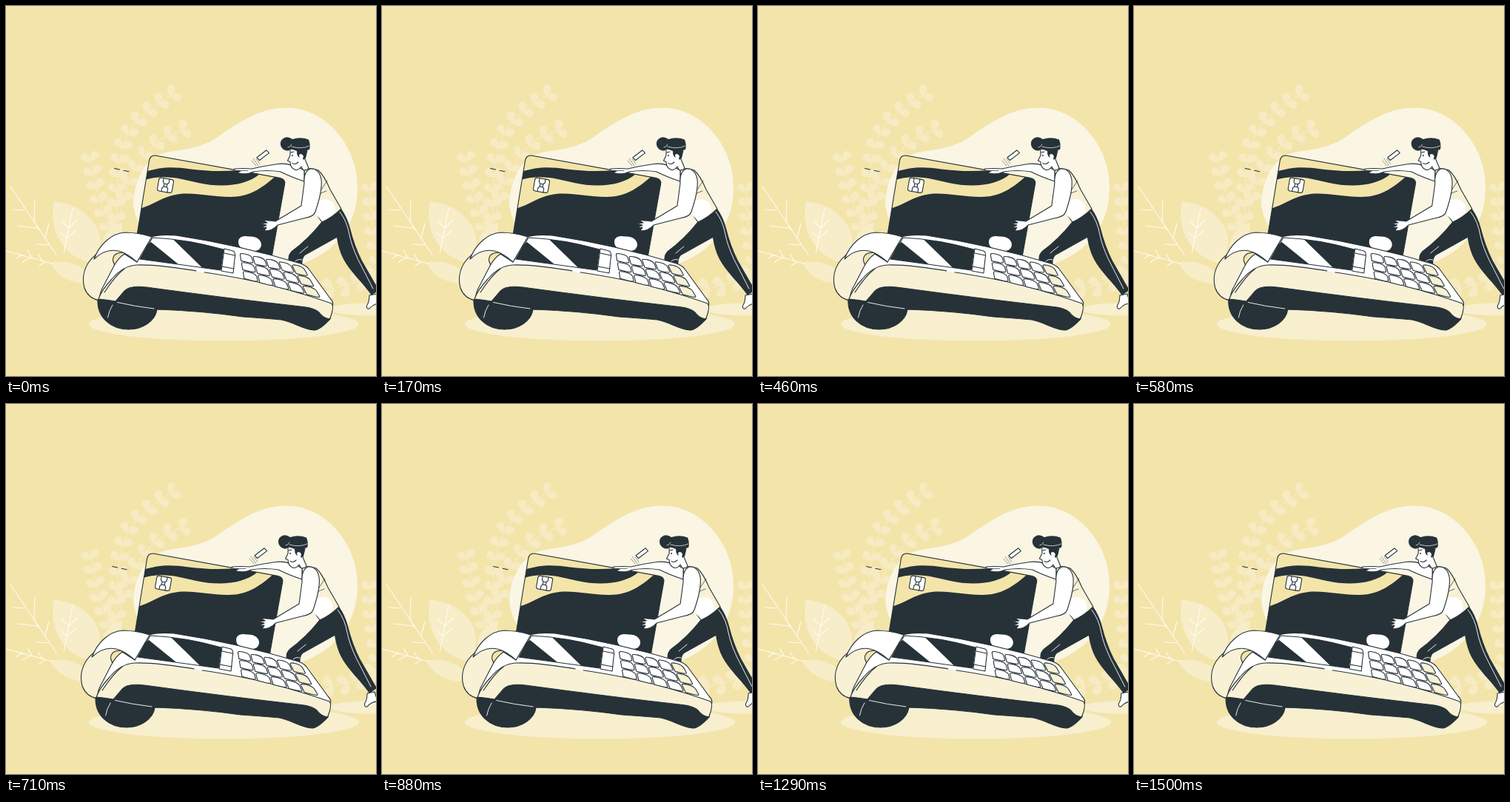
An HTML page for the animation above (1540 ms loop, 500x500 px).

```html
<!DOCTYPE html>
<html lang="en">
<head>
<meta charset="utf-8">
<title>Card payment</title>
<style>
html, body { margin: 0; width: 100%; height: 100%; overflow: hidden; background: #f3e4aa; }
svg { display: block; width: 100vw; height: 100vh; }
.ink { stroke: #263238; stroke-width: 1.1; stroke-linecap: round; stroke-linejoin: round; }
.line { fill: none; }
.white { fill: #fff; }
.cream { fill: #f9f1d5; }
.gold { fill: #f3e4aa; }
.dark { fill: #263238; }
.pale { fill: none; stroke: #fff; stroke-width: .9; stroke-linecap: round; }
.twig { fill: none; stroke: #fffcf0; stroke-width: 1.1; stroke-linecap: round; }
.fine { stroke-width: .7; }
</style>
</head>
<body>
<svg viewBox="0 0 500 500">
  <defs>
    <clipPath id="card"><path id="cardShape" d="M203 202.2 L370 232.4 Q378 234 376.600 241 L359 340 L177 310 L193.500 209 Q195 201 203 202.200Z"/></clipPath>
  </defs>

  <g id="sprigs" fill="#f6ebc2" stroke="#f6ebc2"></g>
  <g fill="#f7edc9">
    <path d="M64.500 264.500 C95 266 123 286 127 314 Q128 334 118 348 C82 341 57 311 64.500 264.500Z"/>
    <path d="M59.500 347 C80 342 107 348 120 374 C96 378 72 370 59.500 347Z"/>
    <path d="M156 292 C135 299 125 318 131 336 C148 332 159 315 156 292Z"/>
  </g>
  <g class="twig">
    <path d="M6 244 L68 336 M39 262 L38 290 L44 302 M10 275 L25 276 M16 297 L42 300 M58 294 L53 313 M40 322 L58 323"/>
    <path d="M0 331 L63 348 M13 342 L21 336 M22 346 L34 340 M29 330 L36 341 M44 336 L49 345 M45 351 L53 346"/>
    <path d="M90 273 L78 335 M75 291 L85 300 L96 289 M74 306 L82 314 L95 303"/>
  </g>
  <path fill="#faf6e3" d="M172 264 C174 236 187 205 216 198 C240 193 258 194 283 179 C315 157 342 138 378 137.500 C431 137 474 187 475 243 C476 302 438 337 395 350 L210 335 C188 312 172 287 172 264Z"/>
  <g fill="#f8efcf">
    <ellipse cx="294.500" cy="430" rx="182.500" ry="22.500"/>
    <ellipse cx="490" cy="410" rx="52" ry="8.500"/>
  </g>

  <g id="scene">
    <path class="ink line" d="M146.500 219.500 L153.500 221 M159 222.300 L166 223.700"/>

    <g clip-path="url(#card)">
      <path class="dark" d="M170 190 H390 V350 H170Z"/>
      <path class="gold" d="M188 195 H280 L312 222 C292 224 270 223 250 220.500 C226 217 211 217 188 224Z"/>
      <path class="gold" d="M185 236 C213 226 238 234 260 239 C292 246 324 243 343 227 L363 231 C345 247 328 258 303 258 C278 258 258 252 235 254 C211 257 200 269 180 274Z"/>
    </g>
    <use href="#cardShape" class="ink line"/>
    <g class="ink" transform="translate(215.500 242.300) rotate(10)">
      <rect class="white" x="-10" y="-9" width="20" height="18" rx="3"/>
      <path class="line" d="M-4 -9 V-4 L-2 -2 V2 L-4 4 V9 M4 -9 V-4 L2 -2 V2 L4 4 V9 M-2 -2 H2 M-2 2 H2"/>
    </g>
    <path class="white" d="M314 319 C314 311 322 310 329 311.500 C338 311 345 316 345 322 C345 330 337 333 329 329.500 C320 329 314 326 314 319Z"/>

    <path class="ink white" d="M339 204.800 L352 194.800 L355.500 198.600 L342.500 208.500Z"/>
    <path class="ink line fine" opacity=".65" d="M334 206 L341 216 M338 206.500 L343 213.500 M332 209 L338 216"/>

    <!-- person -->
    <path class="ink white" d="M491 391 Q491 400 487.500 405 Q487 410 491 409 Q497 402 505 402 L501 389Z"/>
    <path class="dark" d="M427 291 L453 274 Q461 285 465 300 Q471 324 481 344 L504 384 L494 391 C484 376 464 358 456 342 Q450 331 447 313 L404 337 Q399 342 401 354 L382 345 Q380 337 386 331 Q408 315 427 291Z"/>
    <path class="pale" d="M451 278 Q461 291 464 309 Q467 324 476 343 L496 382 M390 346 Q394 341 400 343 M397 334 L408 325"/>
    <path class="ink cream" d="M403 222 Q410 217 422 222 Q430 229 438 248 L453 274 Q441 286 427 292 L416 277 L404 240Z"/>
    <path class="white" d="M418 266 Q432 256 442 266 Q446 271 444 280 Q436 287 428 290.500 L416 280Z"/>
    <path class="ink line fine" d="M424 251 L434 236 M425 253 L433 250"/>
    <path class="ink white" d="M403 222 C392 216 379 212 367 213.500 Q349 216 332 220 Q321 219 309 220 Q306 222 312 222.500 L317 223 L313 225 Q315 227 323 226.700 Q330 226.500 334 224 Q352 221 371 224 Q385 231 403 237Z"/>
    <path class="ink line fine" d="M315 222.500 L327 222.500"/>
    <path class="ink white" d="M411 220 Q402 224 403 240 L399 270 L364 291 Q358 290 354 290 L347 289 L353 293 L344 294 L352 296 L344 300 L352 299 L349 304 Q360 304 367 296 L402 287 Q416 285 418 278 Q428 249 426 234 Q423 219 411 220Z"/>
    <path class="ink white" d="M384 193 L384 202 L380.500 209 L384 210.500 Q384 219 391 221.500 Q396 222 399 217 L402 222 Q407 222 409 219 L404 207 L407 195Z"/>
    <path class="dark" d="M382 195.500 C371 196 368 184 374 179.500 Q380 175 387 180 Q398 176.500 409 180.500 Q412 188 410 194 L406 195 Q407 204 402 208 L399 202 L397 205 Q393 204 393 196 L385 193Z"/>
    <path class="white" d="M396 201 Q400 198 402 203 Q401 209 397 207Z"/>
    <path class="pale fine" d="M381 191 Q384 191 386 187 M386 190 Q399 194 410 189"/>
    <path class="ink line" d="M387 212.500 Q391 215 395 211 M385 198 L389 197"/>
    <circle class="dark" cx="387" cy="202" r="1"/>

    <!-- terminal -->
    <path class="ink cream" d="M128 332 C108 343 101 363 106 381 Q111 395 126 398 L160 356 L177 346 L150 328Z"/>
    <path class="ink gold" d="M159 333 Q144 333 144.500 344 L147 351 L163 340Z"/>
    <path class="ink white" d="M196 312 Q209 308 230 310 Q315 323 398 348 Q407 351 411 358 L438 395 Q443 400 441.500 405 L300 390 L126 397 Q127 386 132 378 L145 353 Q151 341 160 335 L177 346Z"/>
    <path class="dark ink" d="M124 397 C123 420 141 437 166 437 C184 437 202 426 204 410 Q264 412 320 420 Q350 422 372 424 C388 427 402 437 416 438 Q424 438 438 423 L440 410 L300 388 L170 372Z"/>
    <path class="ink cream" d="M125 396 Q129 384 143 369 Q158 351 177 350 Q206 349 266 359.500 Q329 369 370 380.500 Q409 391 440 402 Q443 406 440 416 L437.500 423 Q429 422 423 414 Q417 408 402 406.500 Q300 395 190 380 Q167 377 160 385 L148 399 Q136 397 125 396Z"/>
    <path class="ink line" d="M133 387 Q148 364 160 355"/>
    <path class="pale" style="stroke-width:1.800" d="M258 358 L267 359.500"/>
    <path class="ink white" d="M119 342 C126 323 142 307 161 306 Q178 306 197 312 L177 346 C160 330 140 322 119 342Z"/>

    <path class="ink white" d="M198 313 Q244 315 294 329 L290 357 L181 342Z"/>
    <path class="dark" d="M191 322 L196 319 L233 349 L181 342Z M226 315.500 Q260 319 294 329 L290 357 L265 353.500Z"/>
    <path class="ink white" d="M295 328 L307 331 Q311 333 309 342 L307 361 L291 358Z"/>
    <path class="ink line" d="M295 334 L309 337 M292 352 L308 355"/>
    <g id="keys" class="ink"></g>
    <path class="pale" d="M150.500 400.500 Q174 406 200 409 M144 404 Q139 412 137.500 421"/>
  </g>
</svg>
<script>
const $ = id => document.getElementById(id);
const add = (parent, tag, attrs) => {
  const el = document.createElementNS('http://www.w3.org/2000/svg', tag);
  for (const k in attrs) el.setAttribute(k, attrs[k]);
  return parent.appendChild(el);
};

// A stem with leaf pairs spread evenly along it.
function sprig(d, pairs, size) {
  const stem = add($('sprigs'), 'path', { d, fill: 'none', 'stroke-width': 1.4 });
  const len = stem.getTotalLength();
  for (let i = 1; i <= pairs; i++) {
    const at = len * i / pairs, p = stem.getPointAtLength(at), q = stem.getPointAtLength(at - 2);
    const dir = Math.atan2(p.y - q.y, p.x - q.x) * 180 / Math.PI;
    for (const side of [-48, 48]) add($('sprigs'), 'path', {
      d: `M0 0 C${size * .3} ${-size * .5} ${size} ${-size * .55} ${size} 0 C${size} ${size * .45} ${size * .4} ${size * .4} 0 0Z`,
      transform: `translate(${p.x} ${p.y}) rotate(${dir + side})`, stroke: 'none'
    });
  }
}
sprig('M150 310 C149 230 150 184 176 157 Q193 139 222 121', 11, 15);
sprig('M154 282 C166 220 190 184 236 168', 7, 15);
sprig('M148 318 C132 285 122 250 115 209', 6, 15);
sprig('M512 385 C500 340 494 300 492 250', 7, 14);
sprig('M515 345 Q480 378 442 381', 4, 17);

// Keypad laid over a four-sided area.
const mix = (a, b, t) => a + (b - a) * t;
const pad = (u, v) => [
  mix(mix(315, 402, u), mix(321, 427, u), v),
  mix(mix(333, 352, u), mix(369, 396, u), v)
].map(n => n.toFixed(1)).join(' ');
for (let col = 0; col < 5; col++) for (let row = 0; row < 3; row++) {
  const a = col / 5 + .01, b = a + .178, c = row / 3 + .01, d = c + .3;
  const m = (a + b) / 2;
  add($('keys'), 'path', {
    class: col > 3 ? 'cream' : 'white',
    d: `M${pad(a, c + .07)} Q${pad(a, c)} ${pad(m, c)} T${pad(b, c + .1)} L${pad(b, d - .06)} Q${pad(b, d)} ${pad(m, d)} L${pad(a, d)}Z`
  });
}

// Sideways shake: one offset per 150 ms, shown at 24 pictures a second.
const LOOP = 1540, STEPS = 37, LEAD = 25;
const offsets = [0, -1, 2, -4, 4, -4, 4, -4, 2, -1, 0, 0];
function shake(ms) {
  const step = Math.min(STEPS - 1, Math.floor((ms % LOOP + 5) / LOOP * STEPS));
  const at = (step * LOOP / STEPS + LEAD) / 150, i = Math.floor(at);
  return mix(offsets[i], offsets[i + 1], at - i);
}
const start = performance.now();
function draw(now) {
  const x = shake(Math.max(0, now - start)) + .15;
  $('scene').setAttribute('transform', `translate(${x.toFixed(2)} 0)`);
  requestAnimationFrame(draw);
}
draw(start);
</script>
</body>
</html>
```
